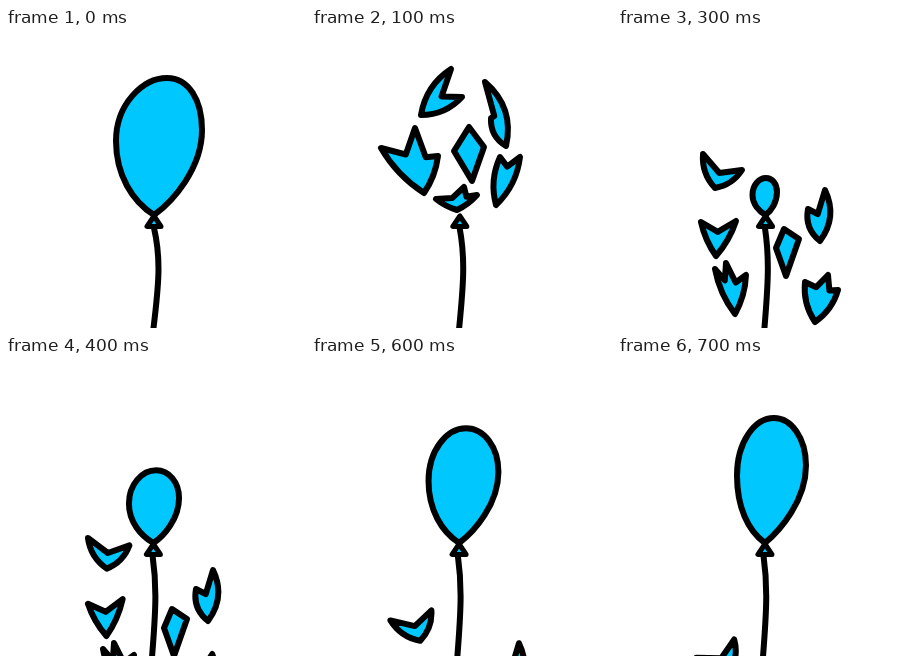
An HTML page that plays this animation: 300 by 300 pixels, repeating every 800 ms.

```html
<!DOCTYPE html>
<html lang="en">
<head>
<meta charset="utf-8">
<title>Balloon pop</title>
<style>
  html, body { margin: 0; width: 100%; height: 100%; overflow: hidden; background: #fff; }
  svg { display: block; width: 100%; height: 100%; }
  path { stroke: #000; stroke-width: 6; stroke-linecap: round; stroke-linejoin: round; fill: #00c8ff; }
  #string { fill: none; }
  #knot { stroke-width: 5; }
</style>
</head>
<body>
<svg viewBox="0 0 300 300">
  <path id="string"/>
  <path id="balloon"/>
  <path id="knot"/>
  <path id="shards"/>
</svg>
<script>
const STEP = 100, STEPS = 8, TIP = 187;

const lerp = (a, b, k) => a.map((v, i) => v + (b[i] - v) * k);
const points = text => text.split(' ').map(p => p.split(',').map(Number));

// Balloon size while it grows: left, right, top x, top y
const sizes = [
  { t: 0, box: [110, 196, 161, 50] },
  { t: 3, box: [134.5, 159, 148, 150] },
  { t: 5, box: [113.5, 184.5, 152, 85] },
  { t: 7, box: [119, 188, 156, 62] }
];

function balloon(t) {
  if (t === 1 || t === 2) return '';
  const i = sizes.findLastIndex(s => s.t <= t);
  const here = sizes[i], next = sizes[i + 1];
  const [left, right, x, top] = t === here.t ? here.box : lerp(here.box, next.box, .55);
  const w = right - left, h = TIP - top, tip = knotX(t);
  const up = k => TIP - h * k;
  return `M${tip},${TIP}
    C${tip - w * .25},${up(.1)} ${left},${up(.29)} ${left},${up(.54)}
    C${left},${up(.81)} ${x - w * .28},${top} ${x},${top}
    C${x + w * .25},${top} ${right},${up(.84)} ${right},${up(.62)}
    C${right},${up(.34)} ${tip + w * .22},${up(.1)} ${tip},${TIP}Z`;
}

const knotX = t => 148 - t * .15;
const knot = t => `M${knotX(t)},188l-7,10.5h14Z`;

// The string's sway dies away after the pop
function string(t) {
  const x = 148 - t * .35, sway = 3 + 2 * 2 ** -t;
  return `M${x},200C${x + sway * 1.4},230 ${x + sway},255 ${x - .5},300`;
}

// Outlines are tips from left to right, then the lower corner.
// burst: just after the pop, fall: two steps later; step and spin link the falling poses.
const shards = [
  { burst: '139,41 150,69 109,87', fall: '85,126 124,142 97,160', step: [-6, 37], spin: -12, depth: .42, bulge: .22 },
  { burst: '179,90 173,54 194,118', fall: '190,181 207,162 202,213', step: [-1, 57], spin: 0, depth: .35, bulge: .3 },
  { burst: '124,171 152,159 165,167 145,182', fall: '83,194 118,193 98,228', step: [2, 48], spin: -6, depth: .3, bulge: .1 },
  { burst: '69,120 103,100 126,128 112,165', fall: '97,241 108,235 128,247 117,286', step: [20, 61], spin: 0, depth: .3, bulge: .12 },
  { burst: '142,123 157,99 172,119 160,153', fall: '158,220 166,201 181,211 168,248', step: [3, 42], spin: 0, depth: 0, bulge: 0 },
  { burst: '188,129 208,129 184,177', fall: '187,254 210,247 220,262 197,294', step: [5, 42], spin: -12, depth: .2, bulge: .18 }
];

// Notches between the tips, bowed sides down to the corner
function outline(pts, { depth, bulge }) {
  const corner = pts[pts.length - 1], tips = pts.slice(0, -1);
  const bow = (a, b) => {
    const [x, y] = lerp(a, b, .5);
    return `Q${x + (b[1] - a[1]) * bulge},${y - (b[0] - a[0]) * bulge} ${b}`;
  };
  let d = 'M' + tips[0];
  for (let i = 1; i < tips.length; i++) {
    d += 'L' + lerp(lerp(tips[i - 1], tips[i], .5), corner, depth) + 'L' + tips[i];
  }
  return d + bow(tips[tips.length - 1], corner) + bow(corner, tips[0]) + 'Z';
}

function place(pts, [dx, dy], deg) {
  const mean = j => pts.reduce((sum, p) => sum + p[j], 0) / pts.length;
  const cx = mean(0), cy = mean(1), a = deg * Math.PI / 180;
  const c = Math.cos(a), s = Math.sin(a);
  return pts.map(([x, y]) => [
    cx + dx + (x - cx) * c - (y - cy) * s,
    cy + dy + (x - cx) * s + (y - cy) * c
  ]);
}

function shardPath(shard, t) {
  if (t === 1) return outline(points(shard.burst), shard);
  const n = t - 3;
  const by = n < 0 ? shard.step.map(v => v * n) : [0, 52 * n ** .8];
  return outline(place(points(shard.fall), by, shard.spin * n), shard);
}

const parts = {
  balloon, knot, string,
  shards: t => t ? shards.map(s => shardPath(s, t)).join('') : ''
};

const start = performance.now();
let shown = -1;

function draw(now) {
  const t = Math.floor(Math.max(0, now - start) / STEP) % STEPS;
  if (t !== shown) {
    for (const id in parts) document.getElementById(id).setAttribute('d', parts[id](t));
    shown = t;
  }
  requestAnimationFrame(draw);
}
draw(start);
</script>
</body>
</html>
```
